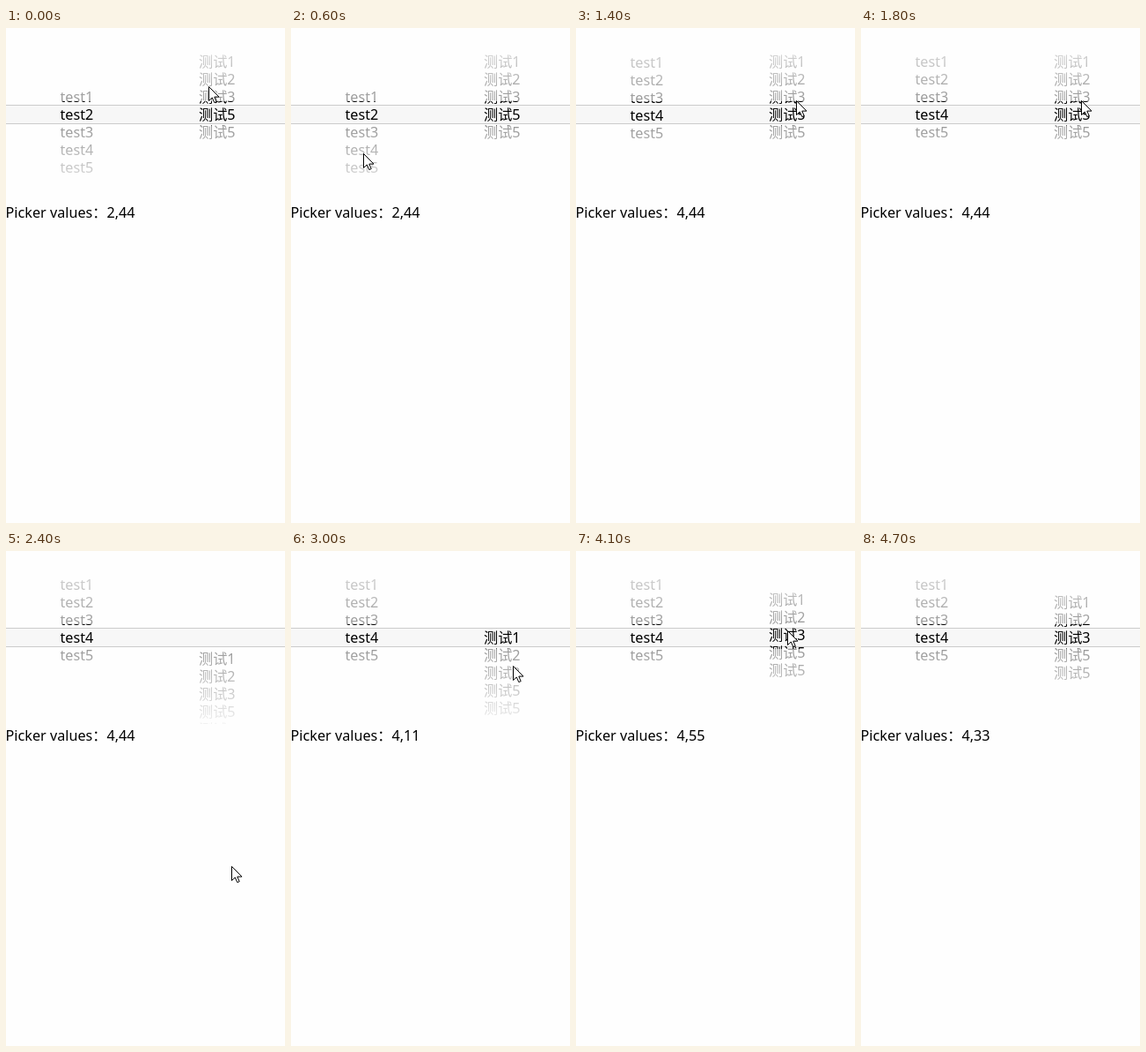
Recreate the animation shown at these times as an HTML page with a canvas. Size 317 px wide and 561 px high, loop 5.5 s.

```html
<!DOCTYPE html>
<html lang="zh-CN">
<head>
<meta charset="utf-8">
<style>
  html, body { margin: 0; width: 100%; height: 100%; overflow: hidden; background: #fefefe; }
  canvas { display: block; }
</style>
</head>
<body>
<canvas id="stage" width="317" height="561"></canvas>
<script>
const ctx = document.getElementById('stage').getContext('2d');
const LOOP = 5500, STEP = 100, ROW = 20, CENTER = 98;
const WIDTH = 317, BAR_TOP = 87, BAR_BOTTOM = 109, PICKER_H = 196;
const arrow = new Path2D('M.5 .5V16.5L4.3 13L6.8 18.6L9.2 17.6L6.8 12.1H12Z');

const clamp = (v, lo, hi) => Math.min(hi, Math.max(lo, v));
function ease(t, from, to) {
  const p = clamp((t - from) / (to - from), 0, 1);
  return p * p * (3 - 2 * p);
}
// Each move is [start time, end time, distance].
const glide = (t, origin, ...moves) =>
  moves.reduce((v, [from, to, d]) => v + d * ease(t, from, to), origin);

// Height of the first row: drags, each followed by a snap to a row.
const leftY = t => glide(t, 78, [700, 1100, -33], [1100, 1500, -7]);
const rightY = t => glide(t, 38,
  [1800, 1900, 25], [2200, 2400, 59], [2400, 2600, -24],
  [3000, 3300, -132], [3300, 3700, 52],
  [3800, 4100, 37], [4200, 4500, 3]);

const pointerX = t => glide(t, 230,
  [0, 600, -148], [700, 1100, 13], [1100, 1400, 155],
  [2200, 2500, 8], [2500, 2800, 12], [2800, 3000, -18],
  [3000, 3400, 20], [3500, 3800, -32]);
const pointerY = t => glide(t, 66,
  [0, 600, 76], [700, 1100, -46], [1100, 1400, -14], [1800, 1900, 25],
  [2200, 2500, 338], [2500, 2800, -274], [2800, 3000, -41],
  [3000, 3400, -160], [3500, 3800, 83], [3800, 4100, 37], [4300, 4400, -130]);

// The label shows the rows nearest the bar when a drag was last let go.
const picked = y => clamp(Math.round((CENTER - y) / ROW), 0, 4) + 1;
function values(t) {
  const release = [0, 1300, 2700, 3400, 4500].filter(r => r <= t).pop();
  return picked(leftY(release)) + ',' + picked(rightY(release)) * 11;
}

function column(prefix, numbers, x, y) {
  numbers.forEach((n, i) => ctx.fillText(prefix + n, x, Math.round(y) + i * ROW + 6));
}

function fade(top, bottom, from, to) {
  const g = ctx.createLinearGradient(0, top, 0, bottom);
  g.addColorStop(0, `rgba(254,254,254,${from})`);
  g.addColorStop(1, `rgba(254,254,254,${to})`);
  ctx.fillStyle = g;
  ctx.fillRect(0, top, WIDTH, bottom - top);
}

function bar() {
  ctx.fillStyle = '#f7f7f7';
  ctx.fillRect(0, BAR_TOP, WIDTH, BAR_BOTTOM - BAR_TOP);
  ctx.fillStyle = '#ccc';
  ctx.fillRect(0, BAR_TOP, WIDTH, 1);
  ctx.fillRect(0, BAR_BOTTOM - 1, WIDTH, 1);
}

function drawPointer(x, y) {
  ctx.save();
  ctx.translate(Math.round(x), Math.round(y));
  ctx.fillStyle = '#fff';
  ctx.fill(arrow);
  ctx.strokeStyle = '#000';
  ctx.stroke(arrow);
  ctx.restore();
}

function draw(t) {
  ctx.fillStyle = '#fefefe';
  ctx.fillRect(0, 0, WIDTH, 561);
  bar();

  ctx.font = '16.2px "Noto Sans", "Noto Sans CJK SC", "Noto Sans CJK", sans-serif';
  ctx.fillStyle = '#000';
  ctx.save();
  ctx.beginPath();
  ctx.rect(0, 0, WIDTH, PICKER_H);
  ctx.clip();
  column('test', [1, 2, 3, 4, 5], 61.5, leftY(t));
  column('测试', [1, 2, 3, 5, 5], 219, rightY(t));
  ctx.restore();

  // The clear window reaches slightly past the bar.
  fade(0, BAR_TOP - 4, 0.95, 0.6);
  fade(BAR_BOTTOM + 2, PICKER_H, 0.6, 0.95);

  ctx.fillStyle = '#000';
  ctx.fillText('Picker values：' + values(t), -0.5, 215);
  drawPointer(pointerX(t), pointerY(t));
}

const start = performance.now();
function tick() {
  const t = (performance.now() - start) % LOOP;
  draw(Math.floor(t / STEP) * STEP);
  requestAnimationFrame(tick);
}
tick();
</script>
</body>
</html>
```
